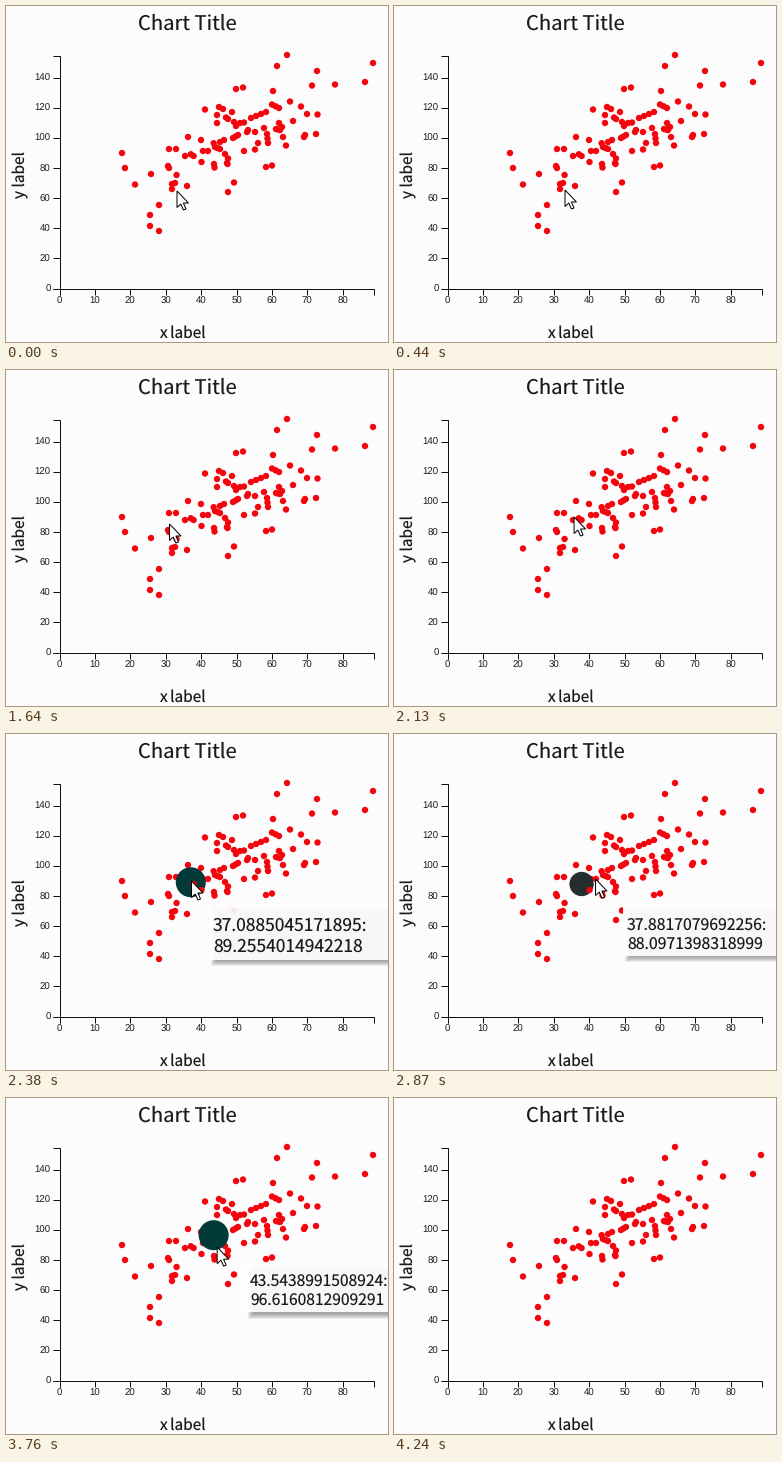
A matplotlib script that plays this animation: 382x336 px, repeating every 4.46 s.

```python
import numpy as np
import matplotlib.pyplot as plt
from matplotlib.animation import FuncAnimation
from matplotlib.patches import Circle, Polygon, Rectangle

W, H, DPI = 382, 336, 64
LOOP, STEP = 4460, 20
RED = np.array([244, 4, 12]) / 255
TEAL = np.array([2, 58, 58]) / 255
SLATE = np.array([36, 46, 46]) / 255
SANS, SMALL = "Noto Sans CJK JP", "Liberation Sans"
R_DOT, R_BIG = 3.2, 15

plt.rcParams["text.hinting"] = "none"
fig = plt.figure(figsize=(W / DPI, H / DPI), dpi=DPI, facecolor="#fcfcfc")
ax = fig.add_axes([0, 0, 1, 1])
ax.set_xlim(0, W)
ax.set_ylim(H, 0)
ax.axis("off")


def pt(px):
    return px * 72 / DPI


def sx(v):
    return 53.5 + 3.54 * v


def sy(v):
    return 282.5 - 1.504 * v


def smooth(p):
    p = np.clip(p, 0, 1)
    return p * p * (3 - 2 * p)


def write(x, y, s, size, font=SANS, **kw):
    kw = {"va": "baseline", "color": "#1a1a1a", **kw}
    return ax.text(x, y, s, fontsize=pt(size), family=font, **kw)


def line(xs, ys):
    ax.plot(xs, ys, color="#111111", lw=pt(1), solid_capstyle="butt",
            solid_joinstyle="miter", zorder=1)


# axes and labels
line([47, 53.5, 53.5, 47], [49.5, 49.5, 282.5, 282.5])
line([53.5, 53.5, 367.5, 367.5], [289, 282.5, 282.5, 289])
for v in range(0, 160, 20):
    line([47, 53.5], [sy(v)] * 2)
    write(44.5, sy(v) + 3.3, str(v), 9.6, SMALL, ha="right")
for v in range(0, 90, 10):
    line([sx(v)] * 2, [282.5, 289])
    write(sx(v), 298.3, str(v), 9.6, SMALL, ha="center")
write(181, 24, "Chart Title", 20.2, ha="center")
write(176, 332, "x label", 15.4, ha="center")
write(19, 169, "y label", 15.4, ha="center", va="center", rotation=90,
      rotation_mode="anchor").set_verticalalignment("baseline")

# loose points, then short straight runs
spots = np.array([
    116, 147, 119, 162, 129, 178.5, 145, 168, 144, 209, 144, 220, 153, 225,
    153, 199, 163, 143, 170, 143, 162, 160, 163, 162, 169, 177, 166, 178,
    166, 183, 181, 180, 182, 131, 179, 150, 195, 134, 197, 145, 202, 145,
    208, 158, 208.5, 161.5, 214, 136, 218, 134, 222, 186, 228, 176.5,
    199, 103.5, 213, 101, 217, 103, 211, 109, 211, 117, 226, 106,
    228, 116, 230, 120, 230, 83, 237, 81.5, 238, 145, 241, 126, 242, 124,
    249, 126, 249, 143.5, 252, 137, 258, 122, 260, 161, 266, 159.5,
    267, 85, 271, 60, 281, 49, 284, 95.5, 295, 100.5, 301, 108,
    311.5, 108.5, 310, 128, 298, 131, 299, 129, 287, 115, 280, 139.5,
    276, 121, 273, 117, 277, 131, 306, 79.5, 311, 65, 329, 78.5,
    359, 76, 367, 57]).reshape(-1, 2)
runs = [(245, 112, 260, 106, 4), (266, 98.5, 273, 102, 3),
        (227, 132, 232, 129, 3), (261, 128, 262, 137, 3),
        (219, 148, 222, 152.5, 2), (220, 111.5, 222, 113, 2),
        (234, 117, 238, 116.5, 2), (270, 123, 274, 124, 3),
        (209, 141, 214, 143, 3), (221, 157, 221.5, 158, 2)]
dots = [tuple(p) for p in spots]
for x0, y0, x1, y1, n in runs:
    dots += zip(np.linspace(x0, x1, n), np.linspace(y0, y1, n))
for p in dots:
    ax.add_patch(Circle(p, R_DOT, fc=RED, lw=0, zorder=2))
ax.add_patch(Circle((195.5, 156), R_DOT, fc=RED, lw=0, zorder=4))

# hovered points: values, time in and out, fill, tip place and text size
HOVERS = [
    ("33.0718572829319", "75.4803861384094", 790, 1150, TEAL, 194, 211, 17.3),
    ("37.0885045171895", "89.2554014942218", 2120, 2600, TEAL, 207, 191, 17.4),
    ("37.8817079692256", "88.0971398318999", 2690, 2990, SLATE, 233, 190, 15.8),
    ("43.5438991508924", "96.6160812909291", 3000, 3760, TEAL, 244, 183, 15.6),
]
marks = []
for xs, ys, *_ in HOVERS:
    mark = Circle((sx(float(xs)), sy(float(ys))), R_DOT, fc=RED, lw=0, zorder=3)
    marks.append(ax.add_patch(mark))

# tooltip
SHADES = 6
shadow = [ax.add_patch(Rectangle((0, 0), 1, 1, fc="black", lw=0, zorder=5))
          for _ in range(SHADES)]
card = ax.add_patch(Rectangle((0, 0), 1, 1, fc="white", lw=0, zorder=6))
rows = [write(0, 0, "", 17, zorder=7) for _ in range(2)]

# pointer
ARROW = np.array([(0, 0), (0, 16.5), (3.8, 13), (6.4, 19), (9, 18),
                  (6.4, 12), (11.5, 12)])
arrow = ax.add_patch(Polygon(ARROW, fc="white", ec="black", lw=pt(1), zorder=9))
PATH = np.array([
    (0, 171, 185), (450, 171, 184), (870, 168.5, 167), (1150, 168, 164),
    (1640, 163.5, 154), (2100, 180, 147), (2380, 185.5, 147),
    (2690, 203, 146), (2870, 201.5, 145), (3000, 205, 141),
    (3270, 210.5, 137), (3680, 210.5, 137), (4220, 222, 342)])


def pointer(t):
    i = min(np.searchsorted(PATH[:, 0], t, side="right"), len(PATH) - 1)
    a, b = PATH[i - 1], PATH[i]
    return a[1:] + (b - a)[1:] * smooth((t - a[0]) / (b[0] - a[0]))


def show_tip(t):
    xs, ys, on, off, _, x, y, size = [h for h in HOVERS if h[2] <= t or h is HOVERS[0]][-1]
    fade = smooth((t - on) / 100) - smooth((t - off) / 200)
    left, top, height = x - 4, y - 1.15 * size, 3.15 * size
    card.set_bounds(left, top, 200, height)
    card.set_alpha(0.92 * fade)
    for k, s in enumerate(shadow):
        grow = 2.5 - k
        s.set_bounds(left + 4 - grow, top + 4 - grow,
                     200 + 2 * grow, height + 2 * grow)
        s.set_alpha(0.065 * fade)
    for k, (row, s) in enumerate(zip(rows, (xs + ":", ys))):
        row.set(text=s, position=(x, y + size * (0.36 + 1.2 * k)),
                fontsize=pt(size), alpha=fade)


def draw(i):
    t = i * STEP
    for mark, (_, _, on, off, fill, *_) in zip(marks, HOVERS):
        p = smooth((t - on) / 250) - smooth((t - off) / 250)
        mark.set_radius(R_DOT + (R_BIG - R_DOT) * p)
        mark.set_facecolor(RED + (fill - RED) * (1 - (1 - p) ** 3))
    show_tip(t)
    arrow.set_xy(ARROW + pointer(t))
    return []


anim = FuncAnimation(fig, draw, frames=LOOP // STEP, interval=STEP,
                     repeat=True, repeat_delay=0)
plt.show()
```
